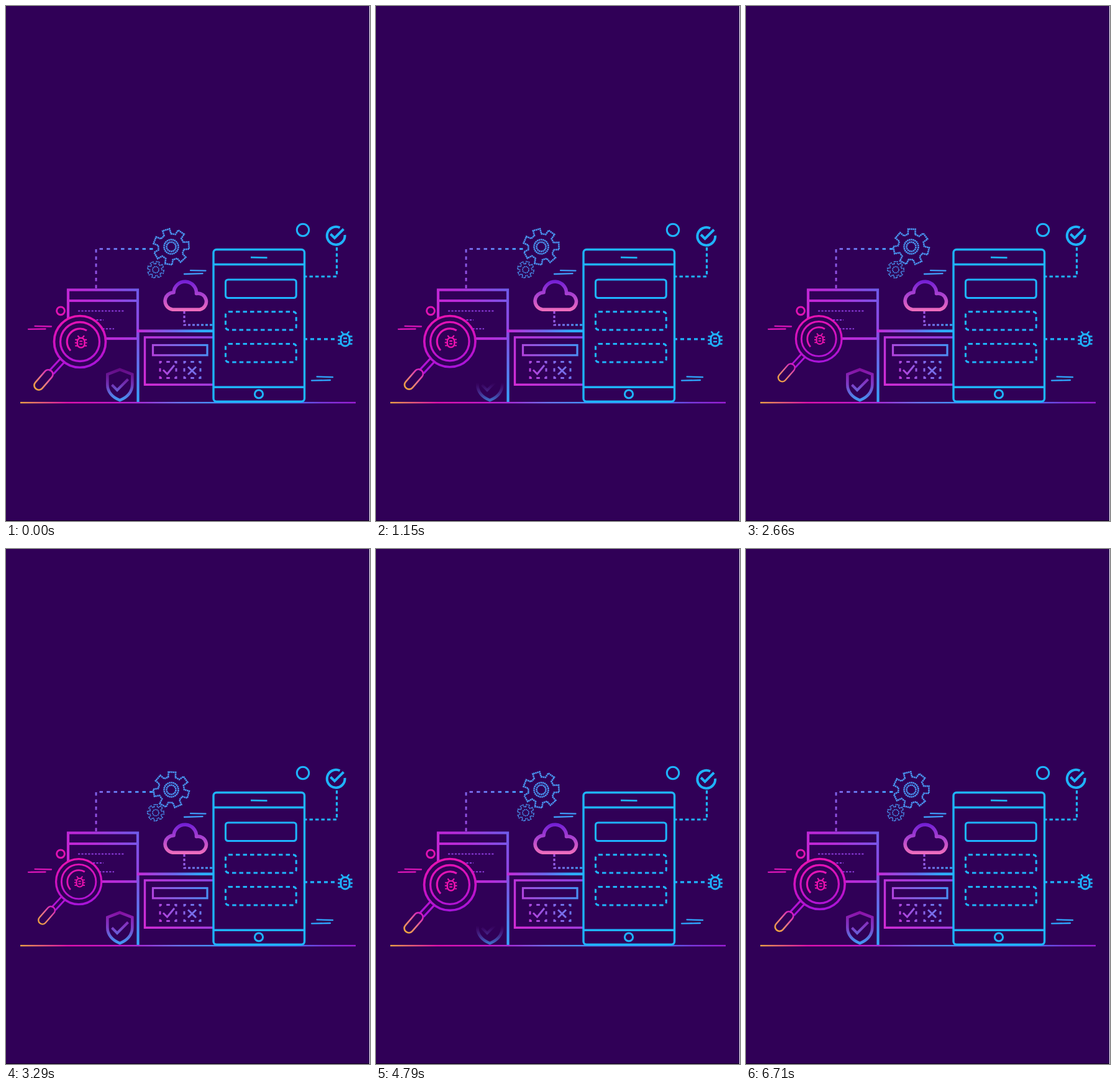
Animation, 586 px wide and 830 px high, one loop 7.57 s. Source, as an HTML page:

```html
<!DOCTYPE html>
<html lang="en">
<head>
<meta charset="utf-8">
<title>Testing scene</title>
<style>
html, body { margin: 0; width: 100%; height: 100%; overflow: hidden; background: #300057; }
svg { display: block; width: 586px; height: 830px; }
</style>
</head>
<body>
<svg viewBox="0 0 586 830" fill="none">
  <defs id="defs">
    <mask id="wipe" maskUnits="userSpaceOnUse" x="150" y="570" width="70" height="80">
      <rect x="150" y="570" width="70" height="80" fill="url(#ramp)"/>
    </mask>
    <linearGradient id="ramp" gradientUnits="userSpaceOnUse" x1="0" x2="0" y1="0" y2="1">
      <stop offset="0" stop-color="#fff" stop-opacity="0"/>
      <stop offset="1" stop-color="#fff"/>
    </linearGradient>
    <g id="bug" stroke-width="3">
      <rect x="-7" y="-8" width="14" height="19" rx="6.8"/>
      <path d="M-3 -1.5H3M-3 4H3" stroke-width="2.6"/>
      <path d="M-7 -4.500H-11.500M-7 1.500H-12M-7 7.500H-11.500M7 -4.500H11.500M7 1.500H12M7 7.500H11.500M-3 -8.500L-6.500 -12.500M3 -8.500L6.500 -12.500" stroke-width="2.6"/>
    </g>
  </defs>
  <rect width="586" height="830" fill="#300057"/>
  <path d="M0 829.5H586" stroke="#12001f"/>
  <path d="M585.5 0V830" stroke="#fff"/>

  <path d="M23 639.2H563" stroke="url(#ground)" stroke-width="2.4"/>

  <!-- connectors -->
  <path d="M145 455V391.5H240" stroke="url(#link)" stroke-width="3" stroke-dasharray="5.5 6"/>
  <path d="M287 492V514H332" stroke="url(#cloudLink)" stroke-width="3.2" stroke-dasharray="4 3"/>
  <g stroke="#1fb4ff" stroke-width="3.2" stroke-dasharray="5.5 4">
    <path d="M532.5 389V436H481"/>
    <path d="M479 536.8H534" stroke-dasharray="6 5"/>
  </g>

  <!-- accent strokes -->
  <g stroke-width="2.3" stroke-linecap="round">
    <path d="M297 426.2L321.5 426.6M287 432L316.5 431.2" stroke="#3f9cf8"/>
    <path d="M500.5 597.3L526 598.2M492 603.6L522 603" stroke="#2fa6fc"/>
    <path d="M46.5 515.8L73 516.5M36 520.8L63.5 520.5" stroke="#d414b4"/>
  </g>

  <!-- browser window -->
  <rect x="100" y="457.5" width="112" height="78.5" stroke="url(#win)" stroke-width="4.2"/>
  <path d="M101 475H211" stroke="url(#win)" stroke-width="4"/>
  <path d="M116 491.5H190M140 506H157M150 520.3H174" stroke="#8c3bdc" stroke-width="2" stroke-dasharray="3.2 2.2"/>

  <!-- panel behind the phone -->
  <path d="M212.5 521.5V638" stroke="url(#post)" stroke-width="4.2"/>
  <path d="M211 523.7H333" stroke="url(#top)" stroke-width="4.4"/>
  <path d="M333 534H223.5V610.3H333" stroke="url(#panel)" stroke-width="3.4"/>
  <rect x="236.5" y="546.5" width="87.5" height="16.3" stroke="url(#bar)" stroke-width="3.2"/>
  <g stroke="url(#bar)" stroke-width="3">
    <path d="M248 573.5H274V599.5H248ZM287 573.5H313V599.5H287Z" stroke-dasharray="5.6 7.4" stroke-dashoffset="2.8"/>
    <path d="M253 586.5L259.5 593L271 579M293 581.5L306 594M306 581.5L293 594"/>
  </g>

  <!-- phone -->
  <g stroke="#1fb4ff" stroke-width="3.4">
    <rect x="334" y="392.5" width="146.5" height="245" rx="5" fill="#300057"/>
    <path d="M334 416.5H480.5M334 614.3H480.5"/>
    <path d="M394 405.2L420.5 405.7" stroke-width="2.8"/>
    <circle cx="407" cy="625.5" r="6.6" stroke-width="3"/>
    <g stroke-width="3.1">
      <rect x="353.5" y="441" width="113.7" height="29.5" rx="4"/>
      <g stroke-dasharray="6.5 5">
        <rect x="353.5" y="492.7" width="113.7" height="29.3" rx="5"/>
        <rect x="353.5" y="544.5" width="113.7" height="29.5" rx="5"/>
      </g>
    </g>
    <circle cx="478" cy="361" r="9.7" stroke-width="3"/>
    <use href="#bug" x="546" y="537"/>
    <g id="tick" stroke-width="4">
      <path d="M537.5 357.3A14.4 14.4 0 1 0 545.5 369"/>
      <path d="M522.5 367.5L529 374L543.5 359.5"/>
    </g>
  </g>

  <path d="M268.2 489.2A13.8 13.8 0 0 1 270 461.7A18.2 18.2 0 0 1 306.5 463.4A13.1 13.1 0 0 1 312 489.2Z" stroke="url(#cloud)" stroke-width="5.6" stroke-linejoin="round"/>

  <g stroke="#4a9af6">
    <g transform="translate(266 388)"><g id="gearA" stroke-width="2.6" stroke-dasharray="2.4 .7"></g></g>
    <g transform="translate(241 425)"><g id="gearB" stroke-width="1.7" stroke-dasharray="1.8 .9"></g></g>
  </g>

  <g mask="url(#wipe)" stroke="url(#shield)">
    <path d="M183.3 585.8L203.3 593.5V610C203.3 622 195 631 183.3 635.3C171.5 631 163.3 622 163.3 610V593.5Z" stroke-width="4.6"/>
    <path d="M170.5 610.5L179 619L196.5 601.5" stroke-width="4.2"/>
  </g>

  <circle cx="88" cy="491.3" r="6.4" stroke="#e012b2" stroke-width="3"/>

  <g id="lens">
    <path d="M87.5 568.5L69.5 588M94 574L76.5 593" stroke="url(#glass)" stroke-width="3.2"/>
    <rect transform="translate(60.5 602.5) rotate(-49)" x="-19" y="-7.3" width="38" height="14.6" rx="7" stroke="url(#grip)" stroke-width="2.7"/>
    <g stroke="url(#glass)">
      <circle cx="119" cy="541" r="41.5" fill="#300057" stroke-width="3.7"/>
      <circle cx="119" cy="541" r="31.5" stroke-width="3.3"/>
    </g>
    <path d="M130 523A21 21 0 0 0 104 555.5" stroke="#e214b4" stroke-width="3.2"/>
    <use href="#bug" transform="translate(120.7 541.5) scale(.82)" stroke="#ea12ae"/>
  </g>
</svg>
<script>
const LOOP = 7570, PULSE = 602, CYCLE = 3640;
const byId = id => document.getElementById(id);
const wave = (t, period) => .5 + .5 * Math.cos(2 * Math.PI * t / period);

// stops are "offset colour" pairs
function gradient(id, x1, y1, x2, y2, ...stops) {
  byId('defs').insertAdjacentHTML('beforeend',
    `<linearGradient id="${id}" gradientUnits="userSpaceOnUse" x1="${x1}" y1="${y1}" x2="${x2}" y2="${y2}">` +
    stops.map(s => s.split(' ')).map(([o, c]) => `<stop offset="${o}" stop-color="${c}"/>`).join('') +
    '</linearGradient>');
}
gradient('ground', 23, 0, 563, 0, '0 #e8a045', '.14 #e011ac', '.29 #c41bcb', '.37 #a035da',
  '.47 #6a74ee', '.56 #4a8ef5', '.82 #4a6cee', '.9 #7a38dc', '1 #9a1cd2');
gradient('link', 145, 455, 238, 391, '0 #9a45dd', '1 #3f9cf8');
gradient('cloudLink', 287, 492, 332, 514, '0 #a04fe0', '1 #38a4fa');
gradient('win', 98, 536, 214, 457, '0 #d01fd0', '.5 #b52cd8', '1 #6c5cea');
gradient('post', 0, 522, 0, 638, '0 #8a48e4', '1 #35a6fb');
gradient('top', 212, 0, 333, 0, '0 #c42ad6', '.5 #6a68ec', '.85 #2cacfd');
gradient('panel', 223, 610, 333, 534, '0 #d42bd6', '1 #8b46e2');
gradient('bar', 236, 599, 324, 555, '0 #c832d8', '1 #4a90f4');
gradient('cloud', 0, 444, 0, 492, '0 #7420d4', '.5 #b146cf', '1 #f26fbc');
gradient('shield', 0, 583, 0, 637, '0 #8d0ea6', '.5 #803cc6', '1 #3d9ef6');
gradient('glass', 100, 499, 112, 590, '0 #e812b0', '.45 #d012c0', '1 #a214dc');
gradient('grip', -20, 0, 20, 0, '0 #eda53c', '.5 #e8708c', '1 #d014c4');

function cog(teeth, tip, root, tipHalf, rootHalf) {
  const pts = [];
  for (let i = 0; i < teeth; i++) {
    const mid = i * 2 * Math.PI / teeth - Math.PI / 2;
    for (const [r, da] of [[root, -rootHalf], [tip, -tipHalf], [tip, tipHalf], [root, rootHalf]])
      pts.push((r * Math.cos(mid + da)).toFixed(2) + ' ' + (r * Math.sin(mid + da)).toFixed(2));
  }
  return `<path d="M${pts.join('L')}Z"/>`;
}
const ring = r => `<circle r="${r}"/>`;
byId('gearA').innerHTML = cog(7, 29, 21, .2, .28) + ring(11.5) + ring(7.5);
byId('gearB').innerHTML = cog(8, 13.4, 9.6, .18, .27) + ring(5);

// moments where the picture rests: start, length
const rests = [[0, 190], [680, 310], [1150, 80], [2660, 160], [3760, 160], [4790, 110],
  [5760, 170], [6290, 290], [6710, 860]];

function draw(now) {
  let t = now % LOOP;
  const rest = rests.find(([start, length]) => t >= start && t < start + length);
  if (rest) t = rest[0];

  const pulse = wave(t, PULSE);
  byId('lens').setAttribute('transform', `translate(103 500) scale(${.88 + .12 * pulse}) translate(-103 -500)`);
  byId('gearA').setAttribute('transform', `rotate(${3 - 20 * pulse})`);
  byId('gearB').setAttribute('transform', `rotate(${16 * pulse})`);

  const phase = t % CYCLE;
  const low = phase > 450 && phase < 2400;
  byId('tick').setAttribute('transform', low ? 'translate(.6 1)' : 'translate(0 0)');

  // soft edge, widening as the shield appears
  const shown = wave(t - 2980, CYCLE), width = 40 + 70 * shown;
  const edge = 583 - width * (1.6 * shown - .6);
  byId('ramp').setAttribute('y1', edge);
  byId('ramp').setAttribute('y2', edge + width);
}

const begin = performance.now();
function tick() {
  draw(performance.now() - begin);
  requestAnimationFrame(tick);
}
tick();
</script>
</body>
</html>
```
